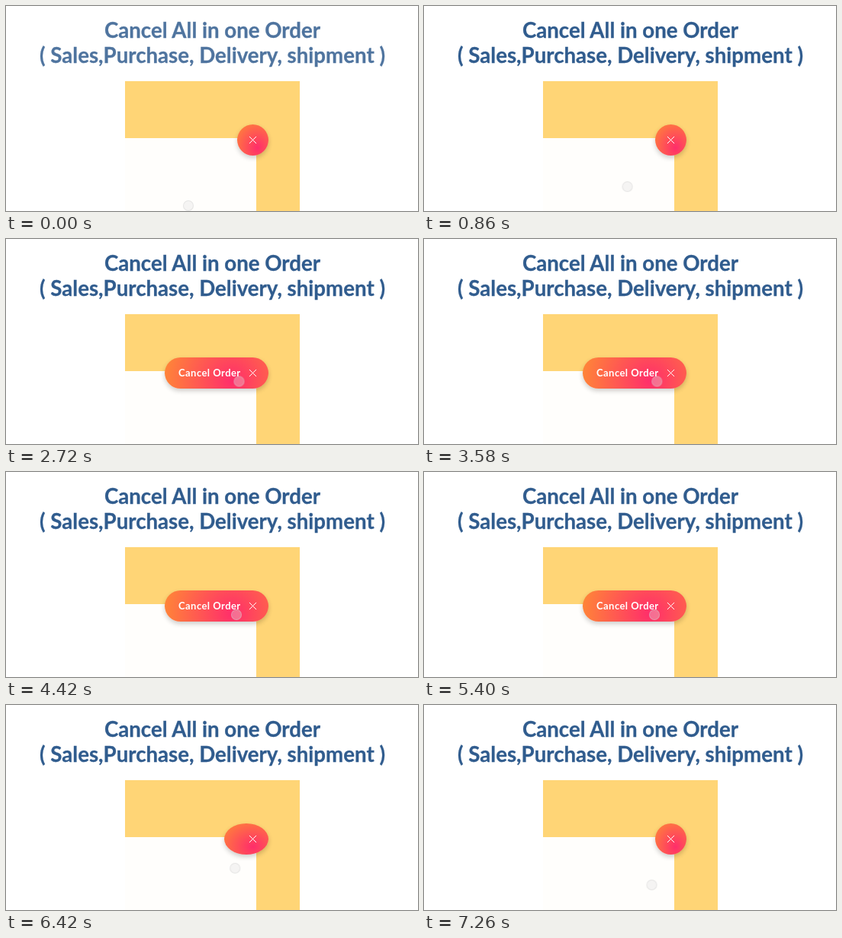
These frames come from a looping animation (540x270 px, 8 s). An HTML page:

```html
<!DOCTYPE html>
<html lang="en">
<head>
<meta charset="utf-8">
<title>Cancel All in one Order</title>
<style>
  @property --rx { syntax: "<percentage>"; inherits: false; initial-value: 92%; }
  @property --ry { syntax: "<percentage>"; inherits: false; initial-value: 106%; }

  html, body { margin: 0; width: 100%; height: 100%; overflow: hidden; background: #fff; }
  .stage { position: relative; width: 540px; height: 270px; overflow: hidden; font-family: Lato, sans-serif; font-weight: 700; }
  .stage > * { position: absolute; }

  .title, .button, .label, .cursor { animation: 8s linear infinite; }

  .title {
    inset: 0; width: 540px; height: 270px;
    font-size: 27.65px; text-anchor: middle;
    fill: #305c8e; stroke: #305c8e; stroke-width: .3;
    animation-name: title;
  }
  .frame { left: 156px; top: 99px; width: 229px; height: 170.5px; background: #ffd576; }
  .panel { left: 156px; top: 173.6px; width: 171.7px; height: 97px; background: #fffefc; }

  .button {
    right: 196px; top: 156px; width: 41.3px; height: 41.3px;
    background: radial-gradient(var(--rx) var(--ry) at 65% 75%, #ff2d6b, #ff8a35);
    box-shadow: 0 3px 6px rgba(0, 0, 0, .2);
    animation-name: button;
  }
  .label {
    right: 232px; top: 168px; color: #fff; white-space: nowrap;
    font-size: 13px; line-height: 16px; letter-spacing: .45px;
    transform-origin: 100% 60%; animation-name: label;
  }
  .cross { left: 318px; top: 171px; width: 11px; height: 11px; stroke: #fff; stroke-width: 1; stroke-linecap: round; }
  .cursor {
    left: -7px; top: -7px; width: 14px; height: 14px; box-sizing: border-box; border-radius: 50%;
    background: rgba(225, 225, 225, .35); border: 1px solid rgba(205, 205, 205, .4);
    animation-name: cursor;
  }

  @keyframes title {
    0% { opacity: .85; }
    3.5%, 100% { opacity: 1; }
  }

  /* Pill while hovered, ellipse shrinking back to a circle after */
  @keyframes button {
    0%, 21.09% { width: 41.3px; border-radius: 50%; --rx: 92%; --ry: 106%; }
    21.1% { width: 41.3px; border-radius: 20.7px; --rx: 92%; --ry: 106%; animation-timing-function: ease; }
    27.3%, 76.99% { width: 136.3px; border-radius: 20.7px; --rx: 70%; --ry: 232%; }
    77% { width: 136.3px; border-radius: 50%; --rx: 92%; --ry: 106%; animation-timing-function: ease; }
    83.25%, 100% { width: 41.3px; border-radius: 50%; --rx: 92%; --ry: 106%; }
  }

  @keyframes label {
    0%, 21.09% { transform: scale(.25, 1.3); opacity: 0; color: #fff; }
    21.1% { transform: scale(.25, 1.3); opacity: 1; color: #fff; animation-timing-function: ease; }
    27.3%, 76.99% { transform: none; opacity: 1; color: #fff; }
    77% { transform: none; opacity: .4; color: #c8472f; }
    78.5%, 100% { transform: none; opacity: 0; color: #c8472f; }
  }

  @keyframes cursor {
    0%, 3.75% { transform: translate(239px, 263px); animation-timing-function: ease-in; }
    10.75% { transform: translate(266.5px, 238px); animation-timing-function: ease-out; }
    19.5%, 43% { transform: translate(305.5px, 187.5px); animation-timing-function: ease-in-out; }
    54%, 72.5% { transform: translate(302px, 188px); animation-timing-function: ease-in; }
    77.25% { transform: translate(301px, 197.5px); }
    82% { transform: translate(299.8px, 225px); animation-timing-function: ease-out; }
    87.5%, 100% { transform: translate(298.5px, 237px); }
  }
</style>
</head>
<body>
<div class="stage">
  <svg class="title">
    <text x="270.5" y="42">Cancel All in one Order</text>
    <text x="270.5" y="75">( Sales,Purchase, Delivery, shipment )</text>
  </svg>
  <div class="frame"></div>
  <div class="panel"></div>
  <div class="button"></div>
  <div class="label">Cancel Order</div>
  <svg class="cross" viewBox="0 0 11 11"><path d="M1.2 1.2 9.8 9.8M9.8 1.2 1.2 9.8"/></svg>
  <div class="cursor"></div>
</div>
</body>
</html>
```
